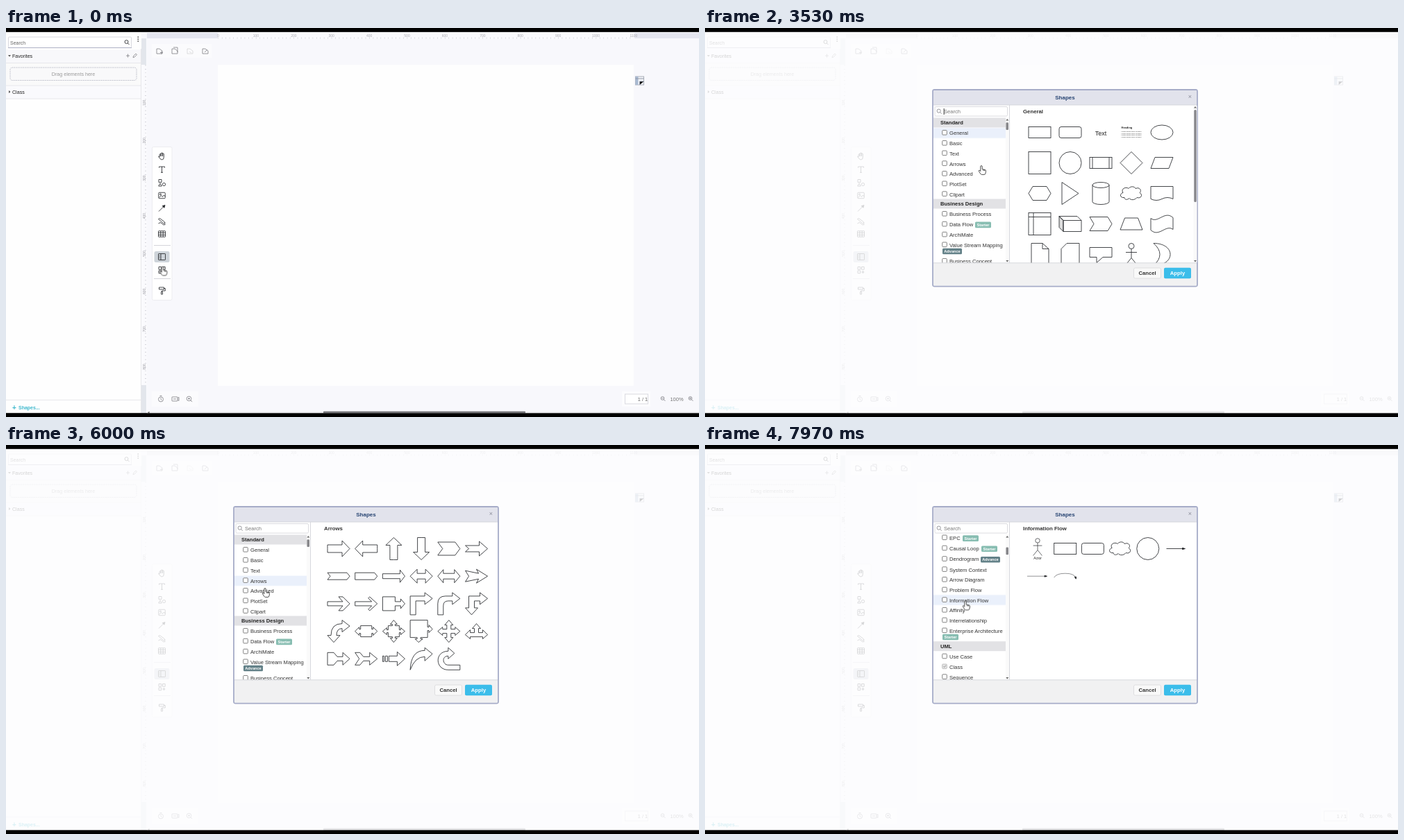
An HTML page that plays this animation: 998 px wide and 561 px high, repeating every 8000 ms.

```html
<!DOCTYPE html>
<html lang="en">
<head>
<meta charset="utf-8">
<title>Shapes dialog</title>
<style>
@property --scroll { syntax: "<length>"; inherits: true; initial-value: 0px; }
html, body { margin: 0; width: 100%; height: 100%; overflow: hidden; background: #000; }
#stage { display: block; width: 100vw; height: 100vh; font-family: "Liberation Sans", Arial, sans-serif; }
.shape, .icon { fill: none; stroke: #25272b; stroke-width: .85; }
.icon.soft { stroke: #85858b; }
.dialog { animation: open 8s linear infinite, scroll 8s infinite; }
.list { transform: translateY(calc(-1 * var(--scroll))); }
.thumb { transform: translateY(calc(var(--scroll) * .052)); }
.selection { animation: select 8s step-end infinite; }
.cursor { animation: move 8s ease-in-out infinite; }
.hand { animation: hand 8s step-end infinite; }
.arrow { animation: arrow 8s step-end infinite; }
.caret { animation: caret 8s step-end infinite; }
.general { animation: general 8s step-end infinite; }
.arrows { animation: arrows 8s step-end infinite; }
.advanced { animation: advanced 8s step-end infinite; }
.info { animation: info 8s step-end infinite; }
@keyframes open { 0%, 33% { opacity: 0 } 36%, 100% { opacity: 1 } }
@keyframes scroll {
  0%, 78.7% { --scroll: 0px; animation-timing-function: ease-out }
  80.1%, 82.5% { --scroll: 54px; animation-timing-function: ease-out }
  84.3%, 85% { --scroll: 108.5px; animation-timing-function: ease-out }
  86.8%, 87.5% { --scroll: 163px; animation-timing-function: ease-out }
  89.9%, 100% { --scroll: 217.5px }
}
@keyframes select {
  0% { transform: translateY(151.5px) }
  56.5% { transform: translateY(195.8px) }
  76% { transform: translateY(210.3px) }
  93.5%, 100% { transform: translateY(441px) }
}
@keyframes move {
  0%, 24% { transform: translate(225.5px, 344.5px) }
  27%, 30.5% { transform: translate(222px, 351.5px) }
  32%, 39.6% { transform: translate(224px, 346px) }
  43.5%, 44.5% { transform: translate(398px, 199px) }
  46.5%, 51.5% { transform: translate(406px, 200px) }
  55%, 72% { transform: translate(370px, 198px) }
  75%, 76.5% { transform: translate(373px, 207px) }
  78.5%, 84% { transform: translate(376.5px, 224.5px) }
  88%, 90% { transform: translate(376.5px, 225.5px) }
  93%, 100% { transform: translate(375px, 225.5px) }
}
@keyframes hand { 0%, 31.5%, 43% { visibility: visible } 25.5%, 40% { visibility: hidden } }
@keyframes arrow { 0%, 31.5%, 43% { visibility: hidden } 25.5%, 40% { visibility: visible } }
@keyframes caret { 0%, 47.9%, 56.5% { visibility: hidden } 41.2%, 54.5% { visibility: visible } }
@keyframes general { 0% { visibility: visible } 56.5%, 100% { visibility: hidden } }
@keyframes arrows { 0%, 76% { visibility: hidden } 59.5% { visibility: visible } }
@keyframes advanced { 0%, 93.5% { visibility: hidden } 82% { visibility: visible } }
@keyframes info { 0% { visibility: hidden } 96.5%, 100% { visibility: visible } }
</style>
</head>
<body>
<svg id="stage" viewBox="0 0 998 561" preserveAspectRatio="none"></svg>
<script>
const rect = (x, y, w, h, fill, extra = "") =>
  `<rect x="${x}" y="${y}" width="${w}" height="${h}" fill="${fill}" ${extra}/>`;
const text = (x, y, label, size = 7.6, fill = "#333", extra = "") =>
  `<text x="${x}" y="${y + size * .36}" font-size="${size}" fill="${fill}" ${extra}>${label}</text>`;
const path = (d, extra = "") => `<path d="${d}" ${extra}/>`;
const at = (x, y, body, cls = "icon") => `<g class="${cls}" transform="translate(${x} ${y})">${body}</g>`;
const turn = (deg, body) => `<g transform="rotate(${deg})">${body}</g>`;
const circle = (r, x = 0, y = 0) => `<circle cx="${x}" cy="${y}" r="${r}"/>`;
const box = (w, h, r = 0) => `<rect x="${-w / 2}" y="${-h / 2}" width="${w}" height="${h}" rx="${r}"/>`;
const label = (x, y, words, size, extra = "") => text(x, y, words, size, "#222", `stroke="none" ${extra}`);
const BOLD = 'font-weight="bold"', MID = 'text-anchor="middle"';

const blockArrow = (shaft, head, neck, notch = 0) => path(
  `M-16 ${-shaft}H${neck}V${-head}L16 0 ${neck} ${head}V${shaft}H-16L${notch - 16} 0z`);
const doubleArrow = (shaft, head, neck) => path(
  `M-16 0L${-neck} ${-head}V${-shaft}H${neck}V${-head}L16 0 ${neck} ${head}V${shaft}H${-neck}V${head}z`);
const cloud = path("M-10 6C-17 7-17 0-12-1-16-7-7-10-4-7-1-11 5-10 6-7 13-10 15-3 12-1 17 2 14 8 8 6 5 10-1 10-3 7-6 10-10 9-10 6z");
const actor = circle(4, 0, -12) + path("M0-8V5M-8-3H8M0 5L-8 15M0 5L8 15");
const diamond = path("M0-16L16 0 0 16-16 0z");

function magnifier(x, y, r, sign = "", cls = "icon soft") {
  return at(x, y, circle(r) + path(`M${r * .7} ${r * .7}l2.3 2.3${sign}`), cls);
}

function rulers() {
  let out = rect(203, 6, 795, 10, "#fafafd") + rect(203, 7, 102, 8, "#e5e6ef") + rect(905, 7, 93, 8, "#e5e6ef")
    + rect(195, 15, 8, 540, "#fafafd") + rect(195, 15, 7, 38, "#e3e6ec") + rect(195, 515, 7, 40, "#e3e6ec")
    + path("M305.5 14.5H904", 'stroke="#c9c9d2" stroke-width="2" stroke-dasharray=".7 4.74"')
    + path("M201 53.5V515", 'stroke="#c9c9d2" stroke-width="2" stroke-dasharray=".7 4.74"');
  for (let i = 0; i <= 11; i++) {
    out += text(305.5 + i * 54.4, 11.5, i * 100, 5, "#aaaab0", MID);
    if (i > 0 && i < 9) out += text(0, 0, i * 100, 5, "#9a9aa0",
      `${MID} transform="translate(199.5 ${53.5 + i * 54.4}) rotate(-90)"`);
  }
  return out;
}

function sidebar() {
  return rect(0, 5.5, 195, 550, "#fefefe")
    + rect(3.5, 13, 177, 15.5, "#fff", 'stroke="#d9d9df" rx="1"') + path("M3 28.5H181", 'stroke="#aeb0c4"')
    + text(6, 21, "Search", 7, "#666") + magnifier(173.5, 20, 2.5, "", "icon")
    + [13, 16, 19].map(y => rect(189.5, y - .7, 1.5, 1.5, "#444")).join("")
    + rect(0, 31, 195, 19, "#f8f8fb") + rect(0, 50, 195, 33, "#fafafa") + rect(0, 83, 195, 19, "#fafafd")
    + path("M0 50.5H195M0 83H195M0 102H195M0 536.5H195M194.5 30V555", 'stroke="#e7e7eb"')
    + path("M3 39l4 0-2 2.5zM4 90l2.5 2-2.5 2z", 'fill="#555"')
    + text(9, 40, "Favorites", 7.1, "#222") + text(9, 92, "Class", 7.1, "#222")
    + at(175.5, 40, path("M-2.5 0H2.5M0-2.5V2.5"), "icon soft")
    + at(185.5, 40, path("M-2.5 2.5l.6-2.2L1.5-3 3-1.5-.4 1.9z"), "icon soft")
    + rect(6, 57, 182, 18.5, "#f9f9fa", 'rx="3" stroke="#a3a5b5" stroke-width=".8" stroke-dasharray="1.4 1.2"')
    + text(97, 66, "Drag elements here", 7.1, "#999", MID)
    + text(9, 547, "+", 10, "#3fb8cd", BOLD) + text(18, 547.5, "Shapes...", 7, "#3fb8cd", BOLD);
}

function toolbar() {
  const hand = "M-3.5 1V-2.5q.8-1 1.5 0V-4q.8-1 1.6 0v-.6q.8-1 1.6 0V-3.5q.8-1 1.6 0V1Q3 5 0 5-2 5-4.8.5q.3-1 1.3.5zM-2-2.5V0M-.4-4V0M1.2-4V0";
  const icons = [
    [185, path(hand)],
    [204, path("M-4-2.5V-4H4v1.5M0-4V4.3M-1.5 4.3h3")],
    [223, path("M-4.5-4.5h4v4h-4zM-2.5 1l2.3 4h-4.6z") + circle(2.1, 3, 2.5)],
    [241.5, box(9.5, 8.5, 1) + circle(1, -2, -1.6) + path("M-4 3L-1 0 1 2 3-.5 4.5 1.5")],
    [260, path("M-4.5 4.5L3-3M4.5-4.5L.7-3.4 3.4-.7z", 'fill="#25272b"')],
    [279, path("M-5-3.5L-3-4.5 4 .8 4.6 3 2 2.6-5-3.5M-5 3Q-2 0 0 3T5 4.5")],
    [297, box(10, 8.5, .5) + path("M-5-1.6H5M-5 1.5H5M-1.7-4V4M1.7-4V4")],
    [330, box(10, 9, .6) + path("M-1.5-4.5V4.5M-3.8-2h1M-3.8 0h1M-3.8 2h1")],
    [349, path("M-4.5-4.5h3.7v3.7h-3.7zM1-4.5h3.7v3.7H1zM-4.5 1h3.7v3.7h-3.7zM3 .8V5M.8 3H5")],
    [378.5, path("M-4-4.5H3v3H-4zM3-3H4.8V.5H0V2M-1 2H1V5.5H-1z")]
  ];
  return rect(210.5, 171.5, 28.5, 221, "#fff", 'rx="2" stroke="#ececf0"')
    + rect(213.5, 322, 22, 16, "#ced4da", 'rx="2.5"')
    + path("M213 313.5H237M213 361.5H237", 'stroke="#d4d4da"')
    + icons.map(([y, body]) => at(224.5, y, body)).join("");
}

function workspace() {
  const sheet = "M-4-3H0L4 0V4H-4z";
  const marks = ["M1 2.5h4M3 .5v4", "M-2-5H4V2", "M-1 1l3 2", "M-1 2l4-4"];
  return rect(195, 5.5, 803, 550, "#f8f8fc") + rect(305, 53, 599, 463, "#fefefe") + rulers()
    + rect(210, 23, 86, 20, "#fbfbfd") + rect(210, 524, 67, 22, "#fbfbfd")
    + marks.map((d, i) => at(221 + i * 22, 33, path(sheet + d, i == 2 ? 'opacity=".3"' : ""), "icon soft")).join("")
    + at(912.5, 76, rect(-6, -6, 12, 12, "#f4f6fa", 'stroke="#a9aeb8"') + rect(-6, -6, 4, 12, "#a9bad2", 'stroke="none"')
      + path("M-6-3H6M0 6V1L6 1", 'stroke="#8f96a4"'), "")
    + at(223, 535.5, circle(3.5) + path("M0-2V0L1.5 1M-1.5-5H1.5"), "icon soft")
    + at(243, 535, box(8, 6, .5) + path("M4-1L6-2.5V2.5L4 1M-2 0H2"), "icon soft")
    + magnifier(263.5, 534.5, 3.3, "M-1.5 0H1.5M0-1.5V1.5")
    + rect(887, 524, 41, 22, "#fcfcfe") + rect(891.5, 528, 33, 14, "#fff", 'stroke="#dadae0"')
    + text(917, 535, "1 / 1", 7.4, "#666", MID)
    + magnifier(945.5, 534, 2.4, "M-1.2 0H1.2") + text(966, 535, "100%", 7.5, "#777", MID)
    + magnifier(985.5, 534, 2.4, "M-1.2 0H1.2M0-1.2V1.2")
    + rect(203, 553, 795, 2.5, "#f0f0f3") + rect(457, 552.8, 291, 3, "#77777b", 'rx="1"')
    + path("M204 554.5l2.5-1.5v3z", 'fill="#555"');
}

const rows = [
  [136.5, "#Standard"], [151.5, "General"], [166.5, "Basic"], [181, "Text"], [195.8, "Arrows"],
  [210.5, "Advanced"], [225, "PlotSet"], [239.8, "Clipart"], [253.5, "#Business Design"],
  [268.5, "Business Process"], [283.3, "Data Flow", "Starter", 389], [298.3, "ArchiMate"],
  [313, "Value Stream Mapping", "Advance"], [336.5, "Business Concept"], [351.5, "EPC", "Starter", 371],
  [366.7, "Causal Loop", "Starter", 398], [382.2, "Dendrogram", "Advance", 397], [397.3, "System Context"],
  [412, "Arrow Diagram"], [426.7, "Problem Flow"], [441.3, "Information Flow"], [456, "Affinity"],
  [470.7, "Interrelationship"], [485.5, "Enterprise Architecture", "Starter"], [507.7, "#UML"],
  [522.7, "Use Case"], [537.5, "Class"], [552.3, "Sequence"]
];

function badge(kind, x, y) {
  const wide = kind == "Advance", w = wide ? 28 : 23;
  return rect(x, y - 4.3, w, 8.6, wide ? "#638188" : "#87bdb1", 'rx="1.5"')
    + text(x + w / 2, y, kind, 5.6, "#fff", `${BOLD} ${MID}`);
}

function listRow([y, name, tag, tagX]) {
  if (name[0] == "#") return rect(329, y - 7, 104, 14, "#e2e2e5") + text(339, y, name.slice(1), 7.6, "#222", BOLD);
  const locked = name == "Class";
  return rect(341.7, y - 4, 6.6, 6.6, locked ? "#e4e4e4" : "#fff", `rx="1" stroke="${locked ? "#bbb" : "#777"}" stroke-width=".9"`)
    + (locked ? path(`M343.3 ${y - .8}l1.3 1.5 2.3-3`, 'fill="none" stroke="#999"') : "")
    + text(352, y, name, 7.6, "#333")
    + (tag ? badge(tag, tagX || 342, y + (tagX ? .6 : 9)) : "");
}

const generalShapes = [
  box(32, 16), box(32, 16, 3), label(0, 1, "Text", 9, MID),
  label(-14.5, -6.5, "Heading", 4, BOLD) + [-1, 1.5, 4, 6.5].map(y => label(-14.5, y, "Lorem ipsum dolor sit amet", 2.4)).join(""),
  '<ellipse rx="16" ry="10.5"/>',
  box(32, 32), circle(16), box(32, 16) + path("M-12-8V8M12-8V8"), diamond, path("M-10-8H16L10 8H-16z"),
  path("M-16 0L-10-10H10L16 0 10 10H-10z"), path("M-12-16L12 0-12 16z"),
  path("M-12-12V12A12 4 0 0 0 12 12V-12A12 4 0 0 0-12-12A12 4 0 0 0 12-12"), cloud,
  path("M-16-10H16V8Q8 4 0 8T-16 8z"),
  box(32, 32) + path("M-9-16V16M-16-10H16"),
  path("M-16-11L-10-5V11L-16 5z", 'fill="#ddd"') + path("M-16-11H10L16-5V11H-10V-5H16M-10-5L-16-11"),
  path("M-16-10H10L16 0 10 10H-16L-10 0z"), path("M-9.5-8.5H9.5L16 8.5H-16z"),
  path("M-16-8C-6 0 4-20 16-9V8C6 0-4 20-16 9z"),
  path("M-12-16H4L13-8V16H-12zM4-16V-8H13"), path("M-5-16H13V16H-13V-8z"),
  path("M-16-10H16V4H3L-6 12V4H-16z"), actor, path("M-12-16C20-16 20 16-12 16Q6 0-12-16z")
];

const bentEnd = "V-16L16-7.5 5 1V-4";
const arrowShapes = [
  blockArrow(5.5, 11.5, 5), turn(180, blockArrow(5.5, 11.5, 5)), turn(-90, blockArrow(5.5, 11.5, 5)),
  turn(90, blockArrow(5.5, 11.5, 5)), path("M-16-9.5H9L16 0 9 9.5H-16L-9 0z"), blockArrow(4.5, 10.5, 4, 5),
  path("M-16-5H12L16 0 12 5H-16L-12 0z"), path("M-16-5H12L16 0 12 5H-16z"), blockArrow(3.5, 9, 9),
  doubleArrow(4, 10, 6), doubleArrow(4, 9.5, 8), path("M-16-8L3-4 0-10 16 0 0 10 3 4-16 8-11 0z"),
  path("M-16-3H6L0-10H6L16 0 6 10H0L6 3H-16z"), path("M-16-3H8L3-8 5-10 16 0 5 10 3 8 8 3H-16z"),
  path("M-16-10H2V-3H10V-7L16 0 10 7V3H2V10H-16z"), path(`M-16 16V-11H5${bentEnd}H-8V16z`),
  path(`M-16 16V0Q-16-11-5-11H5${bentEnd}H-1Q-8-4-8 3V16z`), path(`M-7 16L-16 6H-11V-11H5${bentEnd}H-3V6H2z`),
  path(`M-7 16L-16 6H-11Q-11-11 5-11${bentEnd}Q-3-4-3 6H2z`),
  path("M-8-8H8V-3H10V-6L16 0 10 6V3H8V8H-8V3H-10V6L-16 0-10-6V-3H-8z"),
  path("M0-16L5-10H2V-8H8V-2H10V-5L16 0 10 5V2H8V8H2V10H5L0 16-5 10H-2V8H-8V2H-10V5L-16 0-10-5V-2H-8V-8H-2V-10H-5z"),
  path("M-16-16H9V-6H11V-9L16-3 11 2V-1H9V9H-1V11H2L-4 16-9 11H-6V9H-16z"),
  path("M0-16L6-9H3V-3H9V-6L16 0 9 6V3H3V9H6L0 16-6 9H-3V3H-9V6L-16 0-9-6V-3H-3V-9H-6z"),
  path("M0-11L6-4H3V2H9V-2L16 5 9 11V8H-9V11L-16 5-9-2V2H-3V-4H-6z"),
  path("M-16-9H-7L-2-3H6V-9L16 0 6 9V3H-2L-7 9H-16z"), path("M-16-9H-9L-4-3H5V-9L16 0 5 9V3H-4L-9 9H-16L-10 0z"),
  path("M-16-4h2V4h-2zM-12-4h3V4h-3zM-7-4H5V-10L16 0 5 10V4H-7z"),
  path("M-16 16Q-15-12 5-12V-16L16-7 5 3V-3Q-9-3-16 16z"),
  path("M16 16H-1C-20 16-21-11-1-11V-16L8-8-1 0V-4C-11-4-9 9-1 9H16z")
];

const table = box(32, 24);
const advancedShapes = [
  circle(16) + path("M0 16H16"), path("M-16-5L16-15V16H-16z"), path("M-16-7L-10-13H10L16-7V13H-16z"),
  path("M-16-16H16V4L0 16-16 4z"), path("M-16-8H8A8 8 0 0 1 8 8H-16z"), path("M-16 0L-9-8H8A8 8 0 0 1 8 8H-9z"),
  turn(180, blockArrow(2.5, 7, 8)), blockArrow(2.5, 7, 8), turn(-90, blockArrow(2.5, 8, 8)),
  turn(90, blockArrow(2.5, 8, 8)), doubleArrow(3.5, 9.5, 8), turn(90, doubleArrow(3.5, 9.5, 8)),
  circle(6, 0, -10) + path("M-11 16V4Q-10-3-4-5Q0-3 4-5Q10-3 11 4V16z"),
  path("M-4-16H4V-4H16V4H4V16H-4V4H-16V-4H-4z"), path("M-16-16H16V-8H-8V16H-16z"),
  path("M-16-16H16V-8H4V16H-4V-8H-16z"),
  '<ellipse cy="-12" rx="16" ry="4"/>' + path("M-16-12V12A16 4 0 0 0 16 12V-12M-16-10A16 4 0 0 0 16-10M-16-7A16 4 0 0 0 16-7"),
  circle(16) + path("M-16 0H16M0-16V16"),
  circle(16) + path("M-11.3-11.3L11.3 11.3M-11.3 11.3L11.3-11.3"), circle(16) + path("M-16 0H16"),
  circle(16) + path("M0-16V16"), diamond + path("M-16 0H16"), path("M-16-16H16L-16 16H16z"),
  path("M-16-16Q0-6 16-16Q6 0 16 16Q0 6-16 16Q-6 0-16-16z"),
  [-15, -5, 5].map(x => path(`M${x}-1.5h8l2 3-2 3h-8l2-3z`) + label(x + 3, 1.5, "Step", 2)).join("") + label(-2, -4, "Title", 2.4),
  box(32, 32) + path("M-16-13H16") + label(0, -14.5, "Title", 2.4, MID),
  table + path("M-16-7H16") + label(0, -9.5, "List", 3, MID) + [-3, 2, 8].map(y => label(-14, y, "Item", 3)).join(""),
  label(0, 0, "List Item", 6.3, MID),
  table + path("M-16-9H16M-16-3H16M-16 4H16"), table + path("M-12-12V12M-12-4H16M-12 4H16"),
  path("M-12 16V-16H12V16M-12-13H12M-4-13V16M4-13V16"), path("M-12 16V-16H12V16M-12-13H12M0-13V16M-12-9H12"),
  path("M-16 16V-11H16V16"), "", path("M-16 16V-16H16V16M-16-13H16M-9-10H9V-5H-9z")
];

const infoShapes = [
  `<g transform="translate(0 -2) scale(.8)">${actor}</g>` + label(0, 13.5, "Actor", 5, MID),
  box(32, 16), box(32, 16, 3), cloud, circle(16), path("M-13 0H12") + path("M10-1.2L14 0 10 1.2z", 'fill="#222"'),
  path("M-15 0H12", 'stroke-width=".5"') + path("M10-1L13.5 0 10 1z", 'fill="#222"'),
  path("M-16 2Q-13-4 0-4T15 2", 'stroke-width=".5"') + path("M13.5 1L16 1 15.5 4z", 'fill="#222"')
];

function pane(cls, title, shapes, cols, x, y, step, thumb = 0) {
  const cells = shapes.map((body, i) => at(x + i % cols * step, y + Math.floor(i / cols) * step, body, "shape")).join("");
  const bar = rect(703.5, 112, 5, 226, "#fafafa") + rect(704.3, 118, 3.4, thumb, "#87878b", 'rx="1.5"')
    + path("M704 115.5h4l-2-2.5zM704 335h4l-2 2.5z", 'fill="#666"');
  return `<g class="${cls}">${text(458, 120, title, 7.8, "#333", BOLD)}
    <svg x="439" y="111" width="270" height="227.5" viewBox="439 111 270 227.5">${cells}</svg>${thumb ? bar : ""}</g>`;
}

function dialog() {
  return rect(0, 5.5, 998, 550, "#fdfdfe", 'opacity=".82"')
    + rect(328, 89, 381, 283.5, "#fff", 'rx="2.5" stroke="#a6acc8" stroke-width="1.8"')
    + rect(329, 90, 379, 21, "#e2e3ec") + rect(329, 339, 379, 32.5, "#f1f1f2")
    + path("M329 111H708M329 338.8H708M438.5 111V338.5", 'stroke="#d3d4da" stroke-width=".9"')
    + text(518.5, 100, "Shapes", 8, "#274472", `${BOLD} ${MID}`) + text(698.5, 99, "×", 9, "#8b8d99", MID)
    + rect(331, 113.5, 104.5, 13.5, "#fff", 'rx="1.5" stroke="#dcdce0"')
    + magnifier(336.7, 119.6, 2.6) + text(344, 120.3, "Search", 7.6, "#777")
    + rect(343.7, 116, .9, 9, "#222", 'class="caret"')
    + `<svg x="329" y="129" width="104.5" height="209.3" viewBox="329 129 104.5 209.3"><g class="list">`
    + rect(329, -7.3, 104, 14.6, "#eaf0fb", 'class="selection"') + rows.map(listRow).join("") + "</g></svg>"
    + rect(433, 129, 5, 209, "#fafafa") + rect(433.4, 136.3, 3.6, 10.7, "#87878b", 'class="thumb" rx="1.3"')
    + path("M433.3 133.5h4l-2-2.5zM433.3 335h4l-2 2.5z", 'fill="#666"')
    + pane("general", "General", generalShapes, 5, 482, 150.5, 44, 133)
    + pane("arrows", "Arrows", arrowShapes, 6, 479, 149.5, 39.7)
    + pane("advanced", "Advanced", advancedShapes, 6, 479, 149.5, 39.7, 78)
    + pane("info", "Information Flow", infoShapes, 6, 479, 149.5, 39.7)
    + rect(617.5, 346, 39, 15, "#f9f9f9", 'rx="2" stroke="#dedee0"') + text(637, 353.5, "Cancel", 7.7, "#333", `${BOLD} ${MID}`)
    + rect(661, 345.7, 39, 15.6, "#3bbdea", 'rx="2"') + text(680.5, 353.5, "Apply", 7.7, "#fff", `${BOLD} ${MID}`);
}

const pointer = 'fill="#fff" stroke="#222" stroke-width=".8"';
const cursor = `<g class="cursor">
  ${path("M-1.2.8A1.2 1.2 0 0 1 1.2.8V4.6L5 5.4Q6.7 5.8 6.5 7.4L6 10.5Q5.6 12.4 4 12.4H.5Q-.5 12.4-1.2 11.3L-3.6 7.6Q-4.1 6.4-3 6.2-2.2 6.2-1.2 7.6zM2.8 5v2M4.6 5.4v1.8", `class="hand" ${pointer}`)}
  ${path("M0 0V8.6L2 6.8 3.5 10.3 5 9.6 3.5 6.2H6.2z", `class="arrow" ${pointer}`)}</g>`;

document.getElementById("stage").innerHTML = workspace() + sidebar() + toolbar()
  + `<g class="dialog">${dialog()}</g>` + cursor
  + rect(0, 0, 998, 5.7, "#000") + rect(0, 555.5, 998, 5.5, "#000");
</script>
</body>
</html>
```
